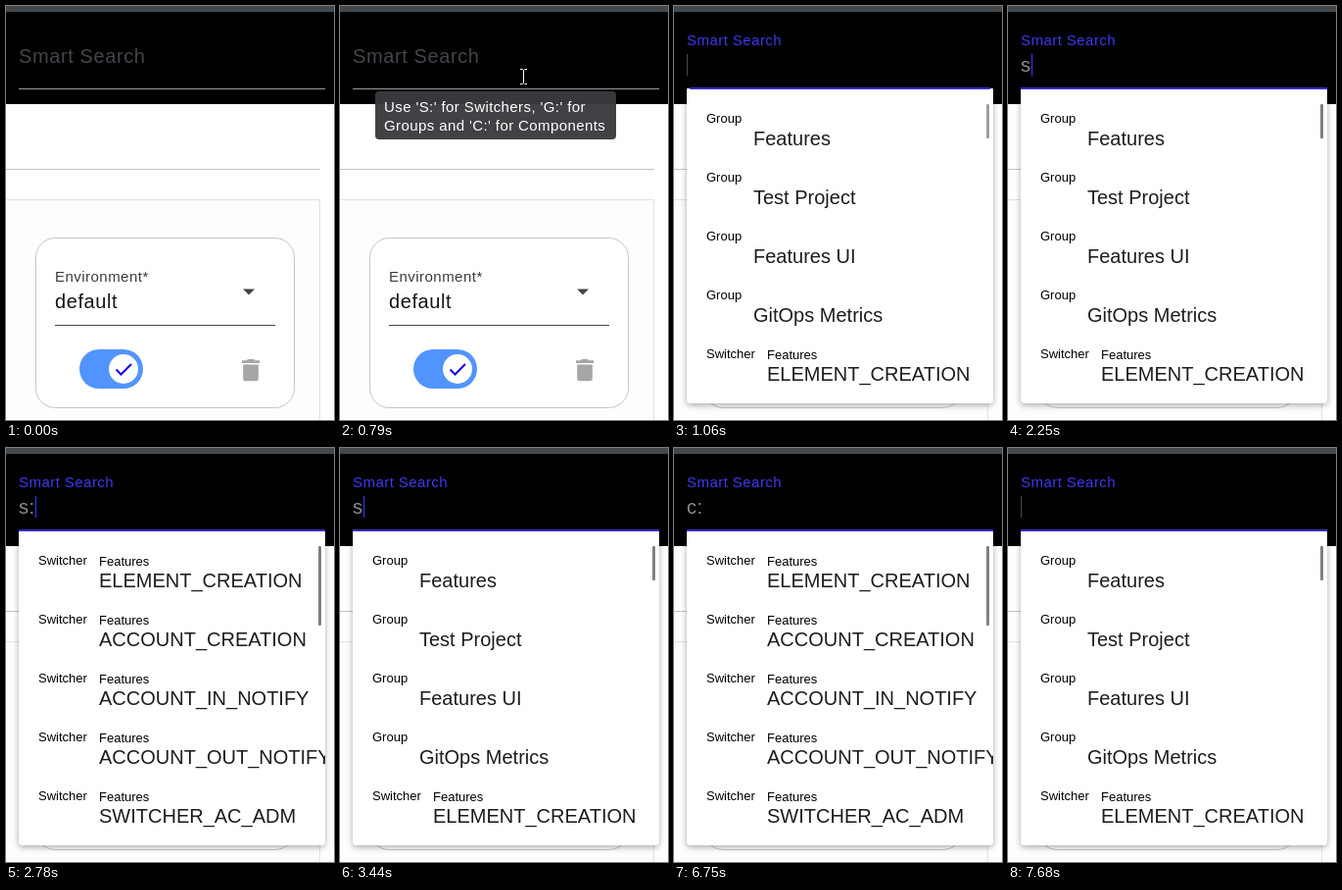
Animation of 335x422 px, one loop 8 s. Source, as an HTML page:

```html
<!DOCTYPE html>
<html lang="en">
<head>
<meta charset="utf-8">
<title>Smart Search</title>
<style>
  html, body { margin: 0; width: 100%; height: 100%; overflow: hidden; background: #fff; }
  svg { display: block; }
  text { font-family: "Liberation Sans", Arial, sans-serif; white-space: pre; }
  .field { font-size: 20px; letter-spacing: .6px; }
  .small { font-size: 13px; fill: #000; }
  .big { font-size: 20px; fill: #1d1d1f; }
  #tip text { font-size: 15px; letter-spacing: .4px; fill: #fff; }
  #sheet { filter: drop-shadow(0 2px 3px rgba(0, 0, 0, .33)); }
</style>
</head>
<body>
<svg width="335" height="422" viewBox="0 0 335 422">
  <!-- page -->
  <rect width="335" height="422" fill="#fff"/>
  <rect width="335" height="100"/>
  <rect width="335" height="6" fill="#42484c"/>
  <path d="M0 166.5H321" stroke="#c4c4c4"/>
  <path d="M-1 197.5H320.5V423H-1Z" fill="#fdfdfd" stroke="#e2e2e2"/>
  <rect x="30.5" y="236.5" width="264" height="173" rx="20" fill="#fff" stroke="#c6c6c6"/>
  <text x="50" y="281" font-size="15" letter-spacing=".47" fill="#3c3c3c">Environment*</text>
  <text x="50" y="308" class="field" fill="#151515">default</text>
  <path d="M242 288.5H254L248 294.5Z" fill="#444"/>
  <path d="M50 325.5H275" stroke="#444"/>
  <rect x="75" y="350" width="65" height="40" rx="20" fill="#5294ff"/>
  <circle cx="120" cy="370" r="15" fill="#fff"/>
  <path d="M112.5 370.5L117.5 375.5L128 365" fill="none" stroke="#1408e8" stroke-width="2"/>
  <path d="M241 361.3H245.5L247 360H253L254.5 361.3H259V364H241ZM242.2 365.5H257.8V380Q257.8 382.3 255.5 382.3H244.5Q242.2 382.3 242.2 380Z" fill="#a6a6a6"/>

  <!-- search field -->
  <path d="M13 84.5H326" stroke="#9a9a9a"/>
  <text id="label" class="field">Smart Search</text>
  <text id="value" class="field" x="13" y="67" fill="#8c8c8c"></text>
  <rect id="caret" y="49" width="1" height="22"/>

  <!-- suggestions -->
  <g id="panel">
    <path id="sheet" d="M13 84H326V401Q326 405 322 405H17Q13 405 13 401Z" fill="#fff"/>
    <svg x="13" y="84" width="313" height="321" viewBox="13 84 313 321">
      <g id="rows"></g>
      <rect id="thumb" x="319" y="100" width="3" rx="1"/>
    </svg>
  </g>
  <rect id="line" y="83" height="2" fill="#3330c4"/>

  <g id="tip">
    <rect x="36" y="87" width="246" height="49" rx="4" fill="#3b3a3e" fill-opacity=".96"/>
    <text x="45" y="108">Use 'S:' for Switchers, 'G:' for</text>
    <text x="45" y="127">Groups and 'C:' for Components</text>
  </g>
  <path id="arrow" d="M.5 .5V16L4 12.7L6.5 18.3L9 17.2L6.6 11.8H11.5Z" fill="#fff" stroke="#000"/>
  <path id="beam" d="M-3.5-7.5H-1L0-6.5L1-7.5H3.5M0-6.5V6.5M-3.5 7.5H-1L0 6.5L1 7.5H3.5" fill="none" stroke="#fff"/>
</svg>
<script>
const LOOP = 8000;
const el = id => document.getElementById(id);
const set = (id, attrs) => {
  for (const k in attrs) el(id).setAttribute(k, attrs[k]);
};

const switchers = ['ELEMENT_CREATION', 'ACCOUNT_CREATION', 'ACCOUNT_IN_NOTIFY',
  'ACCOUNT_OUT_NOTIFY', 'SWITCHER_AC_ADM'].map(name => ['Switcher', name]);
const groups = ['Features', 'Test Project', 'Features UI', 'GitOps Metrics']
  .map(name => ['Group', name]).concat([switchers[0]]);

// pointer: time, kind, x, y
const pointer = [[0], [130, 'arrow', 212, 188], [270, 'arrow', 69, 283],
  [400, 'beam', 187.5, 75], [790, 'beam', 187.5, 72], [1060]];
// tooltip opacity
const tips = [[0, 0], [660, .5], [790, 1], [930, .5], [1060, 0]];
// opening: time, label float, panel opacity, underline width
const opening = [[0, 0, 0, 0], [930, .5, .4, .5], [1060, 1, 1, .98], [1190, 1, 1, 1]];
// typing: time, text, caret shown, filtered list
const typing = [[0, '', 0, 0], [930, '', 1, 0], [1720, '', 0, 0], [2250, 's', 1, 0],
  [2780, 's:', 1, 1], [3180, 's', 0, 1], [3440, 's', 1, 0], [3970, 's', 0, 0],
  [4100, '', 1, 0], [4630, 'c', 1, 0], [5160, 'c', 0, 0], [5690, 'c', 1, 0],
  [6220, 'c:', 1, 1], [6750, 'c:', 0, 1], [7010, 'c', 1, 1], [7140, 'c', 1, 0],
  [7680, '', 1, 0]];
const caretX = [13, 24, 30];

const at = (keys, t) => keys.findLast(k => k[0] <= t);

const rowsHtml = list => list.map(([kind, name], i) => {
  const y = i * 60, nested = kind === 'Switcher';
  return `<text class="small" x="33" y="${y + 119}">${kind}</text>` +
    (nested ? `<text class="small" x="95" y="${y + 360}">Features</text>`.replace(y + 360, y + 120) : '') +
    `<text class="big" x="${nested ? 95 : 81}" y="${y + 142}">${name}</text>`;
}).join('');

let shown;
function showList(filtered) {
  if (shown === filtered) return;
  shown = filtered;
  el('rows').innerHTML = rowsHtml(filtered ? switchers : groups);
  set('thumb', { height: filtered ? 81 : 35 });
}

function draw() {
  const t = performance.now() % LOOP;
  const [, kind, x, y] = at(pointer, t);
  for (const id of ['arrow', 'beam'])
    set(id, { opacity: +(id === kind), transform: `translate(${x || 0} ${y || 0})` });
  set('tip', { opacity: at(tips, t)[1] });

  const [, float, open, width] = at(opening, t);
  set('label', {
    transform: `translate(13 ${58 - 18 * float}) scale(${1 - .25 * float})`,
    fill: float ? '#3d39ee' : '#45454d'
  });
  const scale = .8 + .2 * open;
  set('panel', { opacity: open, transform: `translate(0 ${84 * (1 - scale)}) scale(1 ${scale})` });
  set('line', { x: 169.5 - 156.5 * width, width: 313 * width });

  const [, text, caret, filtered] = at(typing, t);
  el('value').textContent = text;
  set('caret', { x: caretX[text.length], opacity: caret, fill: text ? '#3a38ff' : '#48484c' });
  set('thumb', { fill: width < 1 ? '#a0a0a0' : '#808080' });
  showList(filtered);
  requestAnimationFrame(draw);
}
draw();
</script>
</body>
</html>
```
